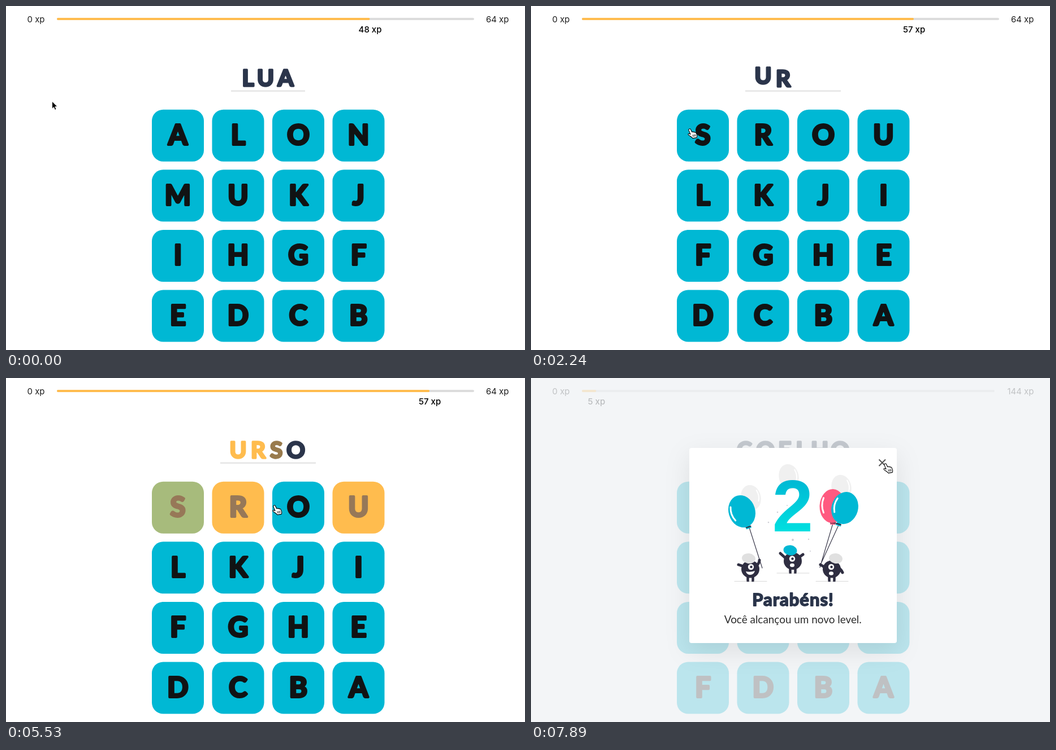
An HTML page that plays this animation: 918 by 610 pixels, repeating every 8 s.

```html
<!DOCTYPE html>
<html lang="pt">
<head>
<meta charset="utf-8">
<title>Letras</title>
<style>
  html, body { margin: 0; width: 100%; height: 100%; overflow: hidden; background: #fff; }
  svg { display: block; width: 918px; height: 610px; }
  text { text-anchor: middle; }
  .xp { font: 400 15px Inter, sans-serif; fill: #1c1c1c; }
  .now { font-weight: 500; fill: #000; }
  .glyph, .letter, .title { font-family: Lato, sans-serif; font-weight: 700; stroke-linejoin: round; }
  .glyph { font-size: 49px; stroke-width: 4; }
  .letter { font-size: 40.5px; stroke-width: 3.4; }
  .title { font-size: 31px; letter-spacing: 1px; fill: #2b354b; stroke: #2b354b; stroke-width: 1.8; }
  .sub { font: 400 18.9px Lato, sans-serif; fill: #2d2d2d; }
  .big { font: 700 130px "Liberation Sans", Arial, sans-serif; fill: url(#aqua); }
  #modal rect { filter: drop-shadow(0 14px 22px rgba(0,0,0,.09)); }
</style>
</head>
<body>
<svg id="stage" viewBox="0 0 918 610">
  <defs>
    <linearGradient id="aqua" x1="0" y1="180" x2="0" y2="272" gradientUnits="userSpaceOnUse">
      <stop offset="0" stop-color="#00b8d4"/><stop offset="1" stop-color="#00dfe0"/>
    </linearGradient>
  </defs>
  <g id="page"></g>
  <rect id="veil" width="918" height="610" fill="#f0f2f5" opacity=".78"/>
  <g id="modal">
    <rect x="280" y="124" width="367" height="346" rx="4" fill="#fff"/>
    <g id="art"></g>
    <path d="M615.5 144.5l11.5 11.5M627 144.5l-11.5 11.5" stroke="#555" stroke-width="2" fill="none"/>
    <text class="title" x="463.5" y="404">Parabéns!</text>
    <text class="sub" x="463.3" y="434.5">Você alcançou um novo level.</text>
  </g>
  <g id="cursor">
    <path id="arrow" d="M0 0V13.2L3 10.4L5.1 15.3L7.5 14.3L5.4 9.5H9.4Z" fill="#000" stroke="#fff" stroke-width=".9"/>
    <g id="hand" transform="translate(-4 0)" stroke="#000" stroke-width="1.1" stroke-linejoin="round" stroke-linecap="round">
      <path fill="#fff" d="M2.6 1.2C3.8.2 5 .9 5.5 2L7.7 6.6C8.4 5.7 9.8 5.8 10.2 6.8C11 6 12.3 6.3 12.7 7.3C13.6 6.8 14.9 7.3 15.1 8.4L16.4 11.6C17 13.6 16.8 15 16.2 16.4L9.2 17.6C7.2 15.2 4.2 13.8 1.5 11.6C.3 10.4 1.5 8.9 2.9 9.4L5 10.4L2 3.4C1.6 2.5 1.8 1.7 2.6 1.2Z"/>
      <path fill="none" stroke-width=".9" d="M9 11.6L10 14.8M11.2 11.2L12.2 14.4M13.3 10.8L14.3 14"/>
    </g>
    <path id="beam" d="M-3.5 -8Q-.6 -8 0 -6.4Q.6 -8 3.5 -8M-3.5 8Q-.6 8 0 6.4Q.6 8 3.5 8M0 -6.4V6.4M-2 2H2" fill="none" stroke="#222" stroke-width="1.3"/>
  </g>
</svg>
<script>
const LOOP = 8000;
const CYAN = [0, 184, 212], ORANGE = [255, 188, 78], NAVY = [43, 53, 75];
const INK = "#111314", BROWN = "#977858", DARK = "#2f2e41";
const $ = id => document.getElementById(id);
const clamp = v => Math.max(0, Math.min(1, v));
const mix = (a, b, k) => `rgb(${a.map((v, i) => Math.round(v + (b[i] - v) * k))})`;

function add(parent, tag, attrs, text) {
  const el = document.createElementNS("http://www.w3.org/2000/svg", tag);
  set(el, attrs);
  if (text) el.textContent = text;
  parent.appendChild(el);
  return el;
}
function set(el, attrs) {
  for (const k in attrs) el.setAttribute(k, attrs[k]);
}

// Rounds: word with letter centres, board, underline, pick times in word order
const rounds = [
  { at: -2000, word: "LUA", xs: [428, 459, 494.5], board: "ALONMUKJIHGFEDCB", line: [398, 529], picks: [1400], xp: 48 },
  { at: 1980, word: "URSO", xs: [410.5, 446, 478, 512.5], board: "SROULKJIFGHEDCBA", line: [379, 548], picks: [4070, 4730, 5330, 5960], xp: 57 },
  { at: 6130, word: "COELHO", xs: [377.5, 414.5, 449, 479, 510.5, 546.5], board: "LHOECNMKJIGPFDBA", line: [345, 581], picks: [], xp: 5 }
];
const progress = [[1980, .75], [2240, .7955], [2510, .872], [2710, .8906], [5960, .8935], [6310, .7], [6580, .26], [6910, .06], [7155, .0347]];
const hop = [[0, 10], [50, 1.5], [130, -3.5], [300, 0]];
const moves = [
  [1470, 408, 301], [1670, 281, 217], [2510, 281, 217], [2710, 304, 218], [2910, 385, 219], [3110, 482, 220],
  [3310, 570, 220], [3510, 603, 220], [3690, 604, 225], [4070, 557, 225], [4330, 498, 224], [4530, 430, 222],
  [4730, 374, 221], [5000, 297, 221], [5330, 298, 222], [5530, 475, 225], [5960, 472, 226], [6310, 472, 226],
  [6580, 472, 226], [6910, 500, 212], [7155, 560, 182], [7400, 604, 160], [7645, 625, 152], [7890, 627, 151]
];
// The picture only advances on these ticks
const ticks = [0];
for (let i = 0; i <= 20; i++) ticks.push(220 + i * 24.5);
ticks.push(...moves.map(m => m[0]), 1980, 2240);
ticks.sort((a, b) => a - b);

const page = $("page");
const bar = (fill) => add(page, "rect", { x: 90, y: 21, height: 4, rx: 2, fill });
add(page, "text", { class: "xp", x: 53, y: 28.5 }, "0 xp");
const goal = add(page, "text", { class: "xp", x: 889.5, y: 28.5, style: "text-anchor:end" });
const track = bar("#dcdcdc"), done = bar("#ffbc4e");
const now = add(page, "text", { class: "xp now", y: 47 });
const rule = add(page, "rect", { y: 149.8, height: 1.7, fill: "#dadada" });
const letters = Array.from({ length: 6 }, () => add(page, "text", { class: "letter" }));
const tiles = Array.from({ length: 16 }, (_, i) => {
  const x = 258 + i % 4 * 106.5, y = 183.7 + (i >> 2) * 106.6;
  return {
    x, y,
    box: add(page, "rect", { x, y, width: 92, height: 92, rx: 20 }),
    glyph: add(page, "text", { class: "glyph", x: x + 46, y: y + 62.3 })
  };
});

const art = $("art");
const oval = (x, y, rx, ry, fill, turn = 0) =>
  add(art, "ellipse", { cx: x, cy: y, rx, ry, fill, transform: `rotate(${turn} ${x} ${y})` });
const stroke = (d, color, width, cap = "round") =>
  add(art, "path", { d, fill: "none", stroke: color, "stroke-width": width, "stroke-linecap": cap });

function balloon(x, y, rx, ry, fill, turn, side) {
  oval(x, y, rx, ry, fill, turn);
  const g = stroke(`M${-rx * .72 * side} ${-ry * .45}Q${-rx * .92 * side} 0 ${-rx * .66 * side} ${ry * .42}`, "#fff", rx > 20 ? 3 : 2);
  g.setAttribute("transform", `translate(${x} ${y}) rotate(${turn})`);
}
function knot(x, y, turn, fill) {
  const g = add(art, "g", { transform: `translate(${x} ${y}) rotate(${turn})` });
  add(g, "path", { d: "M-3 -3L3 -3L5 3H-5Z", fill });
  add(g, "path", { d: "M-5 0H5", stroke: DARK, "stroke-width": 2 });
}
function monster(x, y, hat, hatX, arms, eyeX, smile) {
  stroke(`M${x - 28} ${y + 21.5}h57`, "#d8d8d8", 1);
  stroke(`M${x - 4.5} ${y + 12}v8h-2M${x + 4.5} ${y + 12}v8h2`, DARK, 4.5, "butt");
  stroke(arms, DARK, 5);
  oval(x, y, 16, 15.5, DARK);
  oval(hatX, y - 19, 12, 9, hat, 8);
  oval(eyeX, y - 4, 5.2, 5.2, "#fff");
  oval(eyeX + .5, y - 4, 2.2, 2.2, DARK);
  if (smile) add(art, "path", { d: `M${x - 8} ${y + 4}Q${x} ${y + 6} ${x + 8} ${y + 3}Q${x + 6} ${y + 10} ${x} ${y + 10}Q${x - 6} ${y + 10} ${x - 8} ${y + 4}Z`, fill: "#fff" });
  else oval(eyeX, y + 7.5, 4, 3.2, "#fff");
}

balloon(389, 212, 17.5, 22.5, "#f0f0f0", -14, -1);
balloon(456, 175, 17.5, 22.5, "#f0f0f0", -12, -1);
balloon(549, 194, 17.5, 22.5, "#f0f0f0", -12, -1);
add(art, "text", { class: "big", x: 463, y: 272 }, "2");
[[436, 238, 1.3], [453, 226, 1], [420, 256, 1.3], [463, 287, 1.9], [491, 286, 1.2], [494, 307, 1.1]]
  .forEach(([x, y, r]) => oval(x, y, r, r, "#cfcfd6"));
stroke("M386 265L409 337M534 258L511 336M544 261L513 329", DARK, 1.1);
knot(534, 257, 4, "#ff5a80");
balloon(533, 227, 22.5, 30, "#ff5a80", 3, 1);
knot(544, 259, 18, "#00b8d4");
balloon(555, 230.5, 23.5, 28.8, "#00b8d4", 16, 1);
knot(384.5, 264, -18, "#00b8d4");
balloon(373, 236.5, 23.5, 29, "#00b8d4", -17, 1);
monster(388, 339, "#e0e0e0", 385, "M376 334L367 331M399 332Q404 329 404 323", 389, true);
monster(463, 324.5, "#00b8d4", 458.5, "M451 320L441 311M474 318L481 313", 462, false);
monster(532, 339, "#e0e0e0", 539, "M520 336L512 331M544 337Q549 340 551 345", 531, false);

function along(keys, t) {
  if (t <= keys[0][0]) return keys[0][1];
  for (let i = 1; i < keys.length; i++) {
    const [t0, a] = keys[i - 1], [t1, b] = keys[i];
    if (t <= t1) return a + (b - a) * (t - t0) / (t1 - t0);
  }
  return keys[keys.length - 1][1];
}
function pointer(t) {
  if (t < 1470) {
    const p = clamp((t - 210) / 500), k = p * p * (3 - 2 * p);
    return [81.5 + 326.5 * k, 169 + 102 * k];
  }
  return moves.filter(m => m[0] <= t).pop().slice(1);
}

function draw(t) {
  const r = rounds.filter(q => q.at <= t).pop(), veiled = t >= 5960;

  const total = veiled ? 144 : 64, width = veiled ? 730 : 738;
  const fill = width * along(progress, t);
  set(track, { width });
  set(done, { width: fill });
  set(now, { x: 90 + fill + .5 });
  goal.textContent = total + " xp";
  now.textContent = (veiled ? 5 : r.xp) + " xp";

  set(rule, { x: r.line[0], width: r.line[1] - r.line[0] });
  letters.forEach((el, i) => {
    const age = t - r.at - 130 - i * 80;
    el.textContent = i < r.word.length && age >= 0 ? r.word[i] : "";
    if (!el.textContent) return;
    const lit = i < r.picks.length ? clamp((t - r.picks[i]) / 385) : 0;
    const color = mix(NAVY, ORANGE, lit);
    set(el, { x: r.xs[i], y: 141.8 + along(hop, age), fill: color, stroke: color });
  });

  tiles.forEach((tile, i) => {
    const n = r.word.indexOf(r.board[i]);
    const age = n >= 0 && n < r.picks.length ? t - r.picks[n] : -1;
    const color = age >= 0 ? BROWN : INK;
    tile.glyph.textContent = r.board[i];
    set(tile.glyph, { fill: color, stroke: color });
    set(tile.box, { fill: mix(CYAN, ORANGE, clamp(age / 305)) });
  });

  $("veil").style.display = veiled ? "" : "none";
  $("modal").style.display = t >= 6580 ? "" : "none";

  const [x, y] = pointer(t);
  const overTile = tiles.some(q => x >= q.x && x <= q.x + 92 && y >= q.y && y <= q.y + 92);
  const overClose = x > 610 && y < 162;
  const kind = veiled ? (t < 6310 ? "beam" : overClose ? "hand" : "arrow") : overTile ? "hand" : "arrow";
  for (const id of ["arrow", "hand", "beam"]) $(id).style.display = id === kind ? "" : "none";
  set($("cursor"), { transform: `translate(${x} ${y})` });
}

const start = performance.now();
let last = -1;
function loop() {
  const t = (performance.now() - start) % LOOP;
  const tick = ticks.filter(k => k <= t).pop();
  if (tick !== last) draw(last = tick);
  requestAnimationFrame(loop);
}
loop();
</script>
</body>
</html>
```
